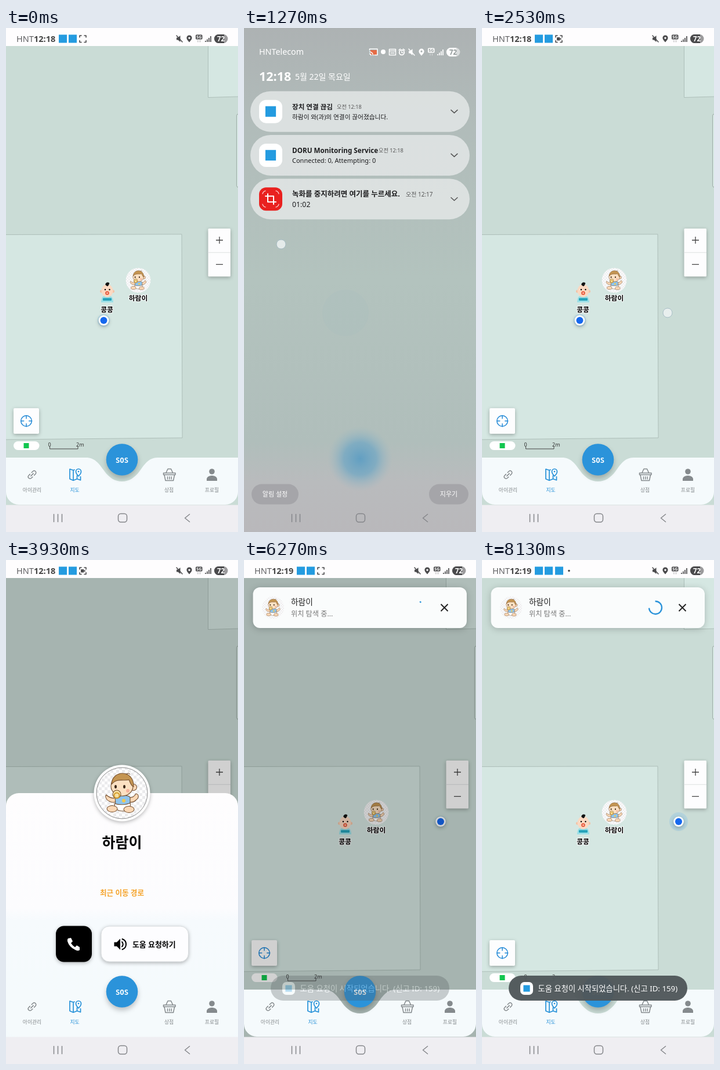
Recreate the animation shown at these times as an HTML page. Size 400 by 867 pixels, loop 8200 ms.

```html
<!DOCTYPE html>
<html lang="ko">
<head>
<meta charset="utf-8">
<title>Child locator</title>
<style>
html, body { margin: 0; width: 100%; height: 100%; overflow: hidden; background: #efeef2; }
svg { display: block; width: 100vw; height: 100vh; }
text { font-family: 'Noto Sans', 'Noto Sans CJK KR', 'Noto Sans CJK', sans-serif; white-space: pre; }
.mid { text-anchor: middle; }
.b { font-weight: 700; }
.m { font-weight: 500; }
.line { fill: none; stroke: currentColor; stroke-linecap: round; stroke-linejoin: round; }
.lift { filter: drop-shadow(0 2px 3px rgba(0,0,0,.28)); }
.soft { filter: drop-shadow(0 2px 6px rgba(0,0,0,.2)); }
.tag { font-weight: 700; font-size: 11.8px; text-anchor: middle; paint-order: stroke; stroke: #fff; stroke-width: 2px; stroke-linejoin: round; }
.tab { font-size: 8.8px; text-anchor: middle; fill: currentColor; }
</style>
</head>
<body>
<svg viewBox="0 0 400 867" preserveAspectRatio="none">
<defs>
  <linearGradient id="fog" x2="0" y2="1">
    <stop offset="0" stop-color="#adb2b3"/><stop offset=".2" stop-color="#b1bcba"/>
    <stop offset=".5" stop-color="#b3c3be"/><stop offset=".82" stop-color="#b0bebb"/>
    <stop offset=".9" stop-color="#b9bbbd"/><stop offset="1" stop-color="#b9b8bb"/>
  </linearGradient>
  <radialGradient id="glow">
    <stop offset="0" stop-color="#629fc2"/><stop offset=".5" stop-color="#74a8c3" stop-opacity=".8"/>
    <stop offset="1" stop-color="#9ab8c2" stop-opacity="0"/>
  </radialGradient>
  <linearGradient id="paper" x2="0" y2="1">
    <stop offset="0" stop-color="#fefdfe"/><stop offset=".45" stop-color="#fcfcfe"/>
    <stop offset=".5" stop-color="#f6fafd"/><stop offset="1" stop-color="#f4fafc"/>
  </linearGradient>
  <pattern id="check" width="10" height="10" patternUnits="userSpaceOnUse">
    <rect width="10" height="10" fill="#fff"/>
    <path d="M0 0h5v5H0zM5 5h5v5H5z" fill="#ebebed"/>
  </pattern>

  <g id="baby">
    <circle r="44" fill="url(#check)"/>
    <g stroke="#76502f" stroke-width="1.1" stroke-linejoin="round">
      <path d="M-10 8C-18 10-24 6-27 3C-30 6-27 12-22 14C-17 17-12 16-9 14zM12 8C18 8 22 5 24 1C30 2 29 9 24 12C20 16 15 16 12 15z" fill="#fad8b6"/>
      <path d="M-12 6C-4 3 10 3 14 7L14 21H-11z" fill="#8fc4ec"/>
      <path d="M-13 18C-4 21 8 20 14 17C16 26 11 31 2 31C-8 31-13 27-13 18z" fill="#fff"/>
      <ellipse cx="-17" cy="27" rx="9" ry="5.5" fill="#fad8b6"/>
      <ellipse cx="12" cy="28" rx="9" ry="5.5" fill="#fad8b6"/>
      <circle cx="20" cy="-10" r="5.5" fill="#fad8b6"/>
      <ellipse cx="0" cy="-12" rx="19" ry="17" fill="#fce0c2"/>
      <path d="M-18-15C-18-40 21-42 20-11C15-13 14-19 12-23C3-20-8-27-18-15z" fill="#c49552"/>
      <path d="M7-32q4-4 7 0" fill="none"/>
      <circle cx="-9" cy="2" r="7" fill="#f5dfa0"/>
      <circle cx="-9" cy="4" r="4.5" fill="none" stroke="#d39a2c" stroke-width="2"/>
    </g>
    <ellipse cx="-11" cy="-11" rx="2" ry="3" fill="#3b2719"/>
    <ellipse cx="4" cy="-11" rx="2" ry="3" fill="#3b2719"/>
    <circle cx="10" cy="-4" r="3" fill="#f5b29d"/>
    <circle cx="3" cy="13" r="3" fill="#f2c84b"/>
  </g>

  <rect id="mark" x="-7" y="-7" width="14" height="14" fill="#249be0"/>

  <g id="signals">
    <path d="M294 16.500h2.500l4-3.500v11l-4-3.500h-2.500z" fill="currentColor"/>
    <path class="line" d="M294 13l10 11" stroke-width="1.500"/>
    <path d="M316 12.500a4.600 4.600 0 0 1 4.600 4.600c0 3-4.600 7.400-4.600 7.400s-4.600-4.400-4.600-7.400a4.600 4.600 0 0 1 4.600-4.600zm0 3a1.700 1.700 0 1 0 .01 0z" fill="currentColor"/>
    <rect x="327" y="11.500" width="11.500" height="8" rx="1.500" fill="currentColor"/>
    <text class="mid b" x="332.800" y="18" font-size="7" fill="var(--ink)">5G</text>
    <path class="line" d="M331 21v3m3.500-3v3" stroke-width="1" opacity=".5"/>
    <path class="line" d="M344 24v-2m3 2v-4.500m3 4.500v-7m3 7v-10" stroke-width="1.700" style="stroke-linecap:butt"/>
    <rect x="359" y="11" width="23.500" height="15" rx="7.500" fill="currentColor" opacity=".55"/>
    <path d="M366.500 11H376v15h-9.500a7.500 7.500 0 0 1 0-15z" fill="currentColor"/>
    <text class="mid b" x="370.500" y="22.700" font-size="11.500" fill="var(--ink)">72</text>
  </g>
</defs>

<g id="map">
  <rect y="31" width="400" height="800" fill="#cadcd6"/>
  <g fill="#d5e7e2" stroke="#aabab5" stroke-width=".9">
    <path d="M-2 355.500L303 354.800L304 705L-2 708z"/>
    <path d="M348.500 30V119.500L402 118V30z"/>
    <rect x="397.500" y="148" width="10" height="126" rx="3" stroke="#98a5a1"/>
  </g>
  <g id="dot">
    <circle id="halo" fill="#58aef5" opacity=".2"/>
    <circle r="8.800" fill="#fff" class="lift"/>
    <circle r="6" fill="#1668ee"/>
  </g>
  <use href="#baby" transform="translate(228 434) scale(.485)"/>
  <text class="tag" x="228" y="469">하람이</text>
  <g>
    <path d="M164 472c0-10 4-12 10-12s11 2 11 12z" fill="#9cdfe6"/>
    <circle cx="164.500" cy="453" r="2.500" fill="#f3c3a6"/><circle cx="184.500" cy="453" r="2.500" fill="#f3c3a6"/>
    <ellipse cx="174.500" cy="452" rx="10" ry="11" fill="#fbd9c2"/>
    <path d="M172 442c-1-4 4-5 6-3c-1 1-1 4-3 5z" fill="#111" stroke="#111"/>
    <circle cx="171" cy="450" r="1.200"/><circle cx="178.500" cy="450" r="1.200"/>
    <circle cx="174.500" cy="456" r="3.300" fill="#e8593c"/><circle cx="174.500" cy="456" r="1.300" fill="#ffd9c8"/>
    <rect x="167" y="464.500" width="15" height="4.500" rx="1" fill="#26a3ba"/>
  </g>
  <text class="tag" x="174" y="489">콩콩</text>
  <g class="lift"><rect x="348.500" y="345" width="38.500" height="82.500" rx="1.500" fill="#fdfdfe"/></g>
  <path d="M348.500 386.200H387" stroke="#dcdfe0"/>
  <path d="M362 365h12m-6-6v12M362 406.700h12" stroke="#444" stroke-width="1.300"/>
  <g class="lift"><rect x="13" y="654" width="44" height="44" rx="2" fill="#fdfdfe"/></g>
  <g class="line" color="#2389d6" stroke-width="1.500">
    <circle cx="35" cy="676" r="9.300"/><path d="M35 666.700v5m0 9v5M25.700 676h5m9 0h5"/>
  </g>
  <rect x="13" y="711" width="44.500" height="15" rx="7.500" fill="#fff"/>
  <rect x="30.500" y="714" width="9" height="9" fill="#12c64f"/>
  <path d="M75.500 720v4h48.500v-4" fill="none" stroke="#444"/>
  <text x="72.500" y="720" font-size="9" fill="#333">0</text>
  <text x="121" y="720" font-size="9" fill="#333">2m</text>
</g>
<rect id="dim" y="31" width="400" height="800"/>

<g id="sheet">
  <path d="M0 423a22 22 0 0 1 22-22H378a22 22 0 0 1 22 22V840H0z" fill="url(#paper)"/>
  <g class="lift"><circle cx="200" cy="401" r="48.500" fill="#fff"/></g>
  <use href="#baby" x="200" y="401"/>
  <circle cx="200" cy="401" r="44" fill="none" stroke="#888"/>
  <text class="mid b" x="200" y="494.500" font-size="25">하람이</text>
  <text class="mid b" x="200" y="577" font-size="12.600" fill="#f5a32a">최근 이동 경로</text>
  <g class="lift"><rect x="86" y="629.500" width="62" height="62" rx="14"/></g>
  <path transform="translate(104 648)" fill="#fff" d="M3 3L8 2L11 8L8 11Q11 16 15 18L18 15L23 18L23 23Q20 25 16 23Q5 18 2 8Q1 5 3 3z"/>
  <g class="lift"><rect x="164" y="630" width="150.500" height="61" rx="14" fill="#fdfdff" stroke="#d8dcde"/></g>
  <path d="M186.500 657.500h4.500l6-6v19l-6-6h-4.500z"/>
  <path class="line" d="M200 657a5.500 5.500 0 0 1 0 8M200.500 652a9.500 9.500 0 0 1 0 18" stroke-width="2"/>
  <text class="b" x="218" y="665.800" font-size="12.900">도움 요청하기</text>
</g>

<g id="tabs">
  <path fill="#f5fafc" d="M0 739H138C153 739 160 749 168 760C177 773 187 780 200 780C213 780 223 773 232 760C240 749 247 739 262 739H400V798a22 22 0 0 1-22 22H22a22 22 0 0 1-22-22z"/>
  <g color="#858a8d">
    <g class="line" stroke-width="1.500" transform="translate(45 768.500) rotate(-45)">
      <path d="M-2-3.200h-3a3.200 3.200 0 0 0 0 6.400h3M2-3.200h3a3.200 3.200 0 0 1 0 6.400h-3M-3 0h6"/>
    </g>
    <text class="tab" x="45" y="798">아이관리</text>
    <path class="line" stroke-width="1.500" d="M271.500 765.500h20.500v3h-20.500zM273 769l2 9.500h13.500l2-9.500M276 765l3-6.500h5.500l3 6.500M278.500 772v4m3.300-4v4m3.300-4v4"/>
    <text class="tab" x="281" y="798">상점</text>
    <circle cx="355" cy="763" r="4.800" fill="currentColor"/>
    <path d="M346 779v-3c0-4 5-6 9-6s9 2 9 6v3z" fill="currentColor"/>
    <text class="tab" x="355" y="798">프로필</text>
  </g>
  <g color="#2490d8">
    <path class="line" stroke-width="1.700" d="M118 760l-2 .800-6-2v17l6 2.500 6.500-2.500 6 2v-6M116 761v17M122.500 770v6M125 771c-3-3-4.500-5-4.500-8a4.500 4.500 0 0 1 9 0c0 3-1.500 5-4.500 8z"/>
    <circle cx="125" cy="763" r="1.300" fill="currentColor"/>
    <text class="tab" x="118.500" y="798">지도</text>
  </g>
  <g style="filter:drop-shadow(0 5px 4px rgba(0,0,0,.22))"><circle cx="200" cy="742.500" r="27.300" fill="#2b93da"/></g>
  <text class="mid b" x="200" y="747.700" font-size="12.300" fill="#fff" style="font-family:'DejaVu Sans Mono',monospace">SOS</text>
</g>

<rect y="820.500" width="400" height="47" fill="#efeef2"/>
<rect width="400" height="31" fill="#fefdfe"/>
<g id="status" color="#4a4a4c" style="--ink:#fff">
  <text x="18" y="23.500" font-size="14.500" fill="#606063">HNT</text>
  <text id="clock" x="48" y="23.500" font-size="14.500" font-weight="600" fill="#444"></text>
  <use href="#mark" x="98" y="18.500"/><use href="#mark" x="115" y="18.500"/>
  <g id="rec">
    <path class="line" stroke-width="1.600" d="M127 16v-3h3M135 13h3v3M138 21.500v3h-3M130 24.500h-3v-3"/>
    <g id="cam"><rect x="129" y="16" width="5.500" height="5.500" rx="1" fill="currentColor"/><path d="M134 18.700l2.500-2v4z" fill="currentColor"/></g>
  </g>
  <g id="extra"><use href="#mark" x="133" y="18.500"/><circle cx="150" cy="18.500" r="1.800" fill="#444"/></g>
  <use href="#signals"/>
</g>

<g id="card">
  <g class="soft"><rect x="15.500" y="47" width="368.500" height="70" rx="12" fill="#fafcfc"/></g>
  <use href="#baby" transform="translate(50 82) scale(.435)"/>
  <text class="m" x="81" y="76.500" font-size="13.700" fill="#222">하람이</text>
  <text x="81" y="97" font-size="12.200" fill="#777">위치 탐색 중...</text>
  <path id="spin" fill="none" stroke="#2b93da" stroke-width="2.300"/>
  <path d="M339.500 76l12 12m0-12l-12 12" stroke="#222" stroke-width="2"/>
</g>

<g id="toast">
  <rect x="46" y="715" width="308" height="43" rx="21.500" fill="#50575a" opacity=".96"/>
  <rect x="66" y="726" width="22" height="22" rx="7" fill="#fff"/>
  <use href="#mark" transform="translate(77 737) scale(.8)"/>
  <text x="96.500" y="741.500" font-size="13.300" fill="#fff">도움 요청이 시작되었습니다. (신고 ID: 159)</text>
</g>

<g id="shade">
  <rect width="400" height="867" fill="url(#fog)"/>
  <circle cx="200" cy="741" r="56" fill="url(#glow)"/>
  <circle cx="175" cy="490" r="40" fill="#9fb5b8" opacity=".12"/>
  <g id="head" fill="#fff">
    <text x="26" y="48" font-size="14.300">HNTelecom</text>
    <text x="26" y="93" font-size="21.500" font-weight="600">12:18</text>
    <text x="88" y="91" font-size="14">5월 22일 목요일</text>
    <g color="#fff" style="--ink:#8f9797">
      <rect x="218" y="40" width="11" height="8" fill="#e56b45"/>
      <path class="line" stroke-width="1.500" d="M216.500 40v-2h13.500v10.500h-5M216.500 43a6 6 0 0 1 6 6M216.500 46.500a2.500 2.500 0 0 1 2.500 2.500"/>
      <circle cx="240" cy="43" r="4"/>
      <path class="line" stroke-width="1.500" d="M250.500 38.500h11v10h-11zM250.500 41.500h11M253 45h6"/>
      <circle class="line" cx="272" cy="44" r="4.300" stroke-width="1.800"/>
      <path class="line" stroke-width="1.500" d="M267 40l2.500-2M277 40l-2.500-2M272 42v2.500h2"/>
      <use href="#signals" x="-10" y="25"/>
    </g>
  </g>
  <g id="list"></g>
  <g id="foot" fill="#fff" font-size="11">
    <rect x="13" y="783" width="81" height="35" rx="17.500" fill="#a5a5a9"/>
    <rect x="319" y="783" width="68" height="35" rx="17.500" fill="#a5a5a9"/>
    <text class="mid m" x="53.500" y="804.500">알림 설정</text>
    <text class="mid m" x="353" y="804.500">지우기</text>
  </g>
</g>

<g id="banner">
  <g class="soft"><rect x="57" y="42.500" width="286" height="35.500" rx="17.700" fill="#eef2f2"/></g>
  <rect x="67" y="48.500" width="23.500" height="23.500" rx="8" fill="#fff"/>
  <use href="#mark" transform="translate(78.700 60.200) scale(.85)"/>
  <text class="b" x="99" y="64.300" font-size="10.600">장치 연결 끊김</text>
  <text x="167.500" y="64.300" font-size="10.500" fill="#222">하람이 와(과)의 연결이 끊어졌습니다.</text>
</g>

<g class="line" color="#85868a" stroke-width="1.500">
  <path d="M82.500 836.500v13M89.500 836.500v13M96.500 836.500v13M316.500 836.500l-8 6.500 8 6.500"/>
  <rect x="193.500" y="835.500" width="15" height="14.500" rx="4.500"/>
</g>
<circle id="touch" r="8" fill="#eef3f3" stroke="#a3b9c3"/>
</svg>

<script>
const LOOP = 8200;
const $ = id => document.getElementById(id);
const clamp = v => Math.min(1, Math.max(0, v));
const ramp = (t, a, b) => clamp((t - a) / (b - a));
const out = (t, a, b) => 1 - (1 - ramp(t, a, b)) ** 3;
const lerp = (a, b, k) => a + (b - a) * k;
const show = (id, o) => {
  $(id).setAttribute('opacity', o);
  $(id).style.display = o > 0 ? '' : 'none';
};
const move = (id, x, y) => $(id).setAttribute('transform', `translate(${x} ${y})`);

// cubic-bezier(.4, 0, .2, 1)
function swift(x) {
  let lo = 0, hi = 1;
  for (let i = 0; i < 20; i++) {
    const u = (lo + hi) / 2, v = 1 - u;
    if (1.2 * v * v * u + .6 * v * u * u + u ** 3 < x) lo = u; else hi = u;
  }
  return 3 * (1 - lo) * lo * lo + lo ** 3;
}

const notes = [
  { title: '장치 연결 끊김', size: 11.6, x: 160, time: '오전 12:18', ts: 9.2, body: '하람이 와(과)의 연결이 끊어졌습니다.', bs: 10.7 },
  { title: 'DORU Monitoring Service', size: 11.7, x: 232, time: '오전 12:18', ts: 9.2, body: 'Connected: 0, Attempting: 0', bs: 11 },
  { title: '녹화를 중지하려면 여기를 누르세요.', size: 12.5, x: 279, time: '오전 12:17', ts: 10, body: '01:02', bs: 12.3, red: true }
];
const recorder = `<rect x="26" y="15" width="40" height="40" rx="12" fill="#e9211f"/>
  <g class="line" color="#fff" stroke-width="2"><path d="M41 26v14h14M37 30h14v14"/>
  <path d="M32 26q1-4 5-5M55 21q4 1 5 5M60 44q-1 4-5 5M37 49q-4-1-5-5" stroke-width="1.300" opacity=".8"/></g>`;
const app = `<rect x="26" y="15" width="40" height="40" rx="12" fill="#fff"/>
  <use href="#mark" transform="translate(46 35) scale(1.300)"/>`;
$('list').innerHTML = notes.map((n, i) => `<g id="note${i}">
  <rect x="11" width="378" height="70" rx="35" fill="#e4e7e8" opacity=".84"/>${n.red ? recorder : app}
  <text class="b" x="83" y="31" font-size="${n.size}" fill="#1c1c1e">${n.title}</text>
  <text x="${n.x}" y="30.500" font-size="${n.ts}" fill="#555">${n.time}</text>
  <text x="83" y="48.500" font-size="${n.bs}" fill="#1c1c1e">${n.body}</text>
  <path class="line" d="M357 32.500l5.500 5 5.500-5" color="#555" stroke-width="1.500"/></g>`).join('');

// start, end of travel, lift-off, from, to
const gestures = [
  [930, 1330, 1360, 64, 60, 64, 426],
  [2130, 2420, 2600, 320, 760, 320, 490],
  [3510, 3620, 3640, 228, 437, 228, 437],
  [5000, 5120, 5140, 240, 661, 240, 661]
];

function drawTouch(t) {
  const g = gestures.find(g => t >= g[0] && t < g[2] + 80);
  if (!g) return show('touch', 0);
  const k = ramp(t, g[0], g[1]);
  move('touch', lerp(g[3], g[5], k), lerp(g[4], g[6], k));
  show('touch', .85 * (1 - ramp(t, g[2], g[2] + 80)));
}

function drawSpinner(ms) {
  const p = (ms / 1333) % 1;
  const head = swift(clamp(p * 2)), tail = swift(clamp(p * 2 - 1));
  const a = Math.PI * (-.5 + 1.5 * tail + ms / 2222 * 2 + p * .5);
  const sweep = Math.max(1.5 * Math.PI * (head - tail), .02);
  const at = q => `${299 + 11 * Math.cos(q)} ${82 + 11 * Math.sin(q)}`;
  $('spin').setAttribute('d', `M${at(a)}A11 11 0 ${sweep > Math.PI ? 1 : 0} 1 ${at(a + sweep)}`);
}

function render(t) {
  const open = out(t, 1030, 1450) - out(t, 2180, 2480);
  show('shade', clamp(open * 1.2));
  notes.forEach((n, i) => move('note' + i, 0, 112.5 + 77.6 * i - (1 - open) * (50 + 30 * i)));
  move('head', 0, (open - 1) * 25);
  move('foot', 0, (1 - open) * 20);

  const drop = out(t, 280, 620);
  show('banner', t < 1500 ? drop * (1 - ramp(t, 1040, 1200)) : 0);
  move('banner', 0, (drop - 1) * 70 + 60 * out(t, 1040, 1300));

  show('status', t < 280 || t > 2400 ? 1 : 0);
  $('clock').textContent = t < 5200 ? '12:18' : '12:19';
  show('cam', t > 1500 && t < 4560 ? 1 : 0);
  show('rec', t < 7000 ? 1 : 0);
  show('extra', t < 7000 ? 0 : 1);

  const up = out(t, 3630, 3910) - ramp(t, 5870, 6130) ** 2;
  move('sheet', 0, (1 - up) * 475);
  show('sheet', up > 0 ? 1 : 0);
  show('dim', .18 * (ramp(t, 3630, 3880) - ramp(t, 6270, 6620)));

  const moved = t > 6080;
  move('dot', moved ? 339 : 168.5, moved ? 450 : 503);
  $('halo').setAttribute('r', moved ? lerp(10, 16, out(t, 6500, 7000)) : 11);

  const card = out(t, 5950, 6200);
  show('card', card);
  move('card', 0, (card - 1) * 40);
  drawSpinner(Math.max(0, t - 6180));
  show('toast', ramp(t, 6200, 6440));
  drawTouch(t);
}

const start = performance.now();
(function tick() {
  render((performance.now() - start) % LOOP);
  requestAnimationFrame(tick);
})();
</script>
</body>
</html>
```
